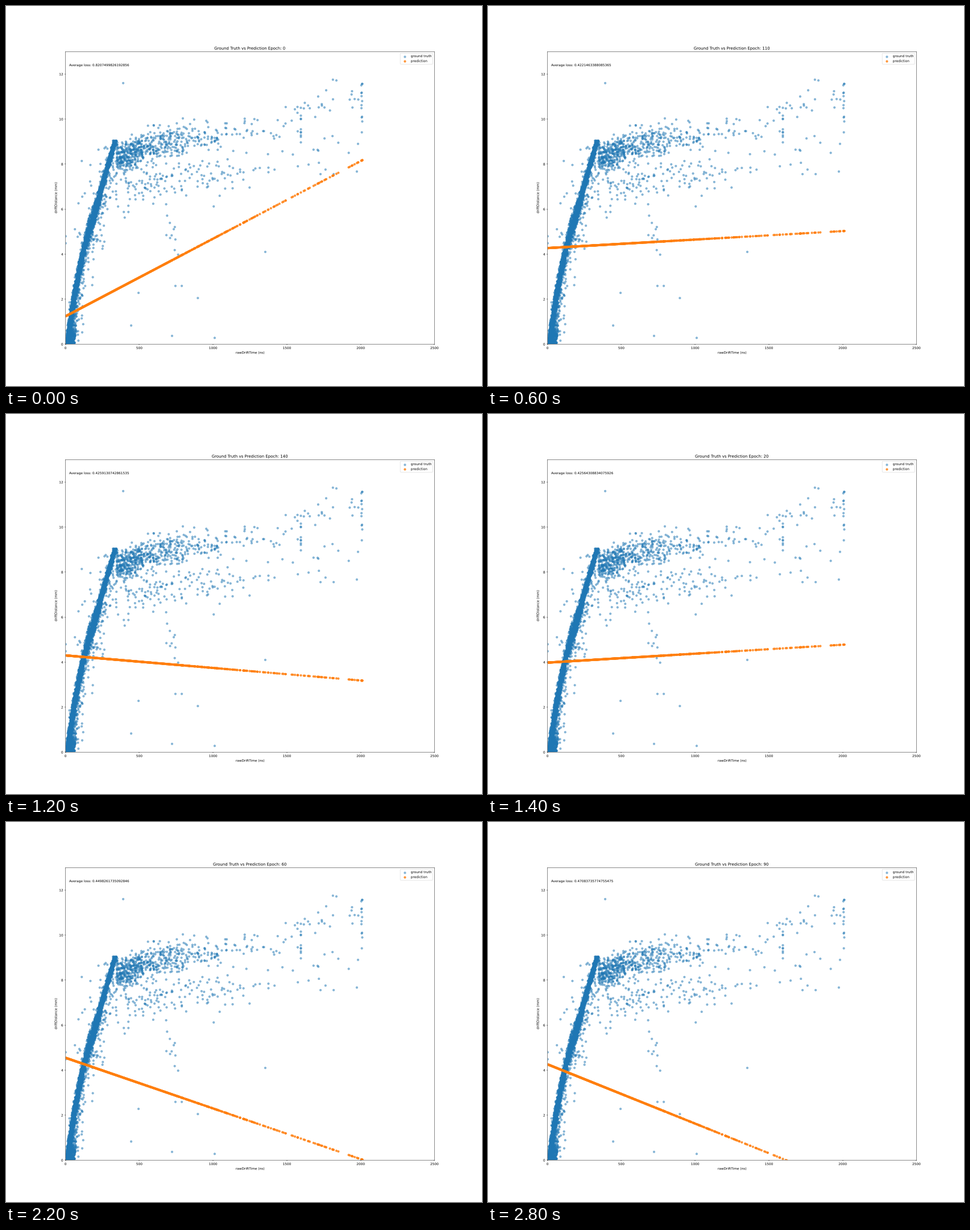
Recreate the animation shown at these times as a matplotlib script. Size 837x669 px, loop 3000 ms.

```python
import numpy as np
import matplotlib.pyplot as plt
from matplotlib.animation import FuncAnimation
from matplotlib.patheffects import Normal
from matplotlib.text import Text

W, H, DPI = 837, 669, 41.85
T_MAX = 2013
plt.rcParams.update({"font.family": "DejaVu Sans", "text.hinting": "none"})
rng = np.random.default_rng(11)

# Fitted line per epoch: distance at time 0, distance at T_MAX, average loss
FITS = {
    0: (1.24, 8.18, "0.8207499826192856"),
    10: (4.10, -0.80, "0.4745120381637452"),
    20: (3.98, 4.78, "0.42564308834075926"),
    30: (4.62, 7.20, "0.43218460937251846"),
    40: (4.45, 9.39, "0.45198189215660095"),
    50: (4.45, -0.45, "0.4587302916473820"),
    60: (4.55, 0.02, "0.4498261735092846"),
    70: (4.66, 1.17, "0.4397827160358429"),
    80: (4.50, 1.75, "0.4351640928173465"),
    90: (4.26, -1.04, "0.47083735774755475"),
    100: (4.42, 0.76, "0.4412736085194027"),
    110: (4.27, 5.03, "0.4221463388085365"),
    120: (4.17, 4.89, "0.4224018352746108"),
    130: (4.16, 4.76, "0.4227454949021339"),
    140: (4.30, 3.18, "0.4259130742861535"),
}
EPOCHS = sorted(FITS, key=str)  # name order: 0, 10, 100, ...

# the most isolated hits
STRAY = [(391, 11.6), (1354, 4.1), (1011, 0.28), (722, 0.37), (445, 0.83),
         (495, 2.28), (745, 2.59), (788, 2.59), (897, 2.05)]


def drift_time(y):
    """Typical drift time of a hit at distance y."""
    return np.interp(y, [0, 2, 4, 6, 9], [14, 55, 115, 203, 335])


def band(n):
    y = rng.uniform(0, 9.05, n)
    spread = 6.5 + 5.5 * np.exp(-((y - 5.5) / 0.9) ** 2)
    return drift_time(y) + rng.normal(0, spread, n).clip(-26, 26), y


def fringe(n, low, high, reach):
    """Hits trailing off to one side of the band."""
    y = rng.uniform(low, high, n)
    return drift_time(y) + np.sign(reach) * rng.exponential(abs(reach), n), y


def corner(n):
    y = rng.exponential(0.45, n)
    return rng.uniform(4, 62, n) + 12 * y, y


def upper_cloud(n):
    x = 345 + rng.exponential(290, n).clip(0, 1250)
    rise = 1 - np.exp((345 - x) / 600)
    return x, 8.25 + 1.65 * rise + rng.normal(0, 0.3 + 0.12 * rise, n)


def lower_cloud(n):
    x = 380 + 1050 * rng.beta(1.2, 1.9, n)
    return x, 7.3 + 0.0006 * (x - 700) + rng.normal(0, 0.45, n)


def late_hits(n):
    """Thin rising tail, with a few hits well below it."""
    x = np.hstack([rng.uniform(1400, 1850, n - 9), rng.uniform(1908, 2005, 9)])
    high = 10 + 0.002 * (x - 1400) + rng.normal(0, 0.35, n)
    return x, np.where(rng.random(n) < 0.5, high, rng.uniform(7.2, 9.6, n))


def time_limit(n):
    return rng.uniform(2004, T_MAX, n), 9 + 2.6 * np.sqrt(rng.random(n))


def make_hits():
    parts = [
        band(4200), corner(250), fringe(330, 0, 5, 20), fringe(80, 4, 7, 22),
        fringe(75, 5.8, 8.3, 70), fringe(45, 4, 8.8, -50),
        upper_cloud(600), lower_cloud(145), late_hits(50), time_limit(13),
        (rng.uniform(350, 1020, 13), rng.uniform(3.9, 6.2, 13)),
        np.transpose(STRAY),
    ]
    x, y = np.hstack([np.array(p) for p in parts])
    return x.clip(1, T_MAX), y


def scatter(x, y, **style):
    # one size per point keeps the markers off the pixel grid
    return ax.scatter(x, y, s=np.full(len(x), 36.0), **style)


hit_t, hit_y = make_hits()
pred_t = np.unique(np.round(hit_t))

fig, ax = plt.subplots(figsize=((W + 0.01) / DPI, (H + 0.01) / DPI), dpi=DPI)
scatter(hit_t, hit_y, alpha=0.5, label="ground truth")
pred = scatter(pred_t, np.zeros_like(pred_t), alpha=0.8, label="prediction")
ax.set(xlim=(0, 2500), ylim=(0, 13),
       xlabel="rawDriftTime (ns)", ylabel="driftDistance (mm)")
ax.legend(loc="upper right")
title = ax.set_title("")
loss_text = ax.text(0.01, 0.95, "", transform=ax.transAxes)


def update(i):
    epoch = EPOCHS[i]
    start, end, loss = FITS[epoch]
    y = start + (end - start) * pred_t / T_MAX
    pred.set_offsets(np.column_stack([pred_t, y]))
    title.set_text(f"Ground Truth vs Prediction Epoch: {epoch}")
    loss_text.set_text(f"Average loss: {loss}")
    return pred, title, loss_text


# smooth, unsnapped lines and text at this low resolution
fig.canvas.draw()
for artist in fig.findobj():
    artist.set_snap(False)
for text in fig.findobj(Text):
    text.set_path_effects([Normal()])

anim = FuncAnimation(fig, update, frames=len(EPOCHS), interval=200,
                     init_func=lambda: update(0), repeat=True, repeat_delay=0)
plt.show()
```
